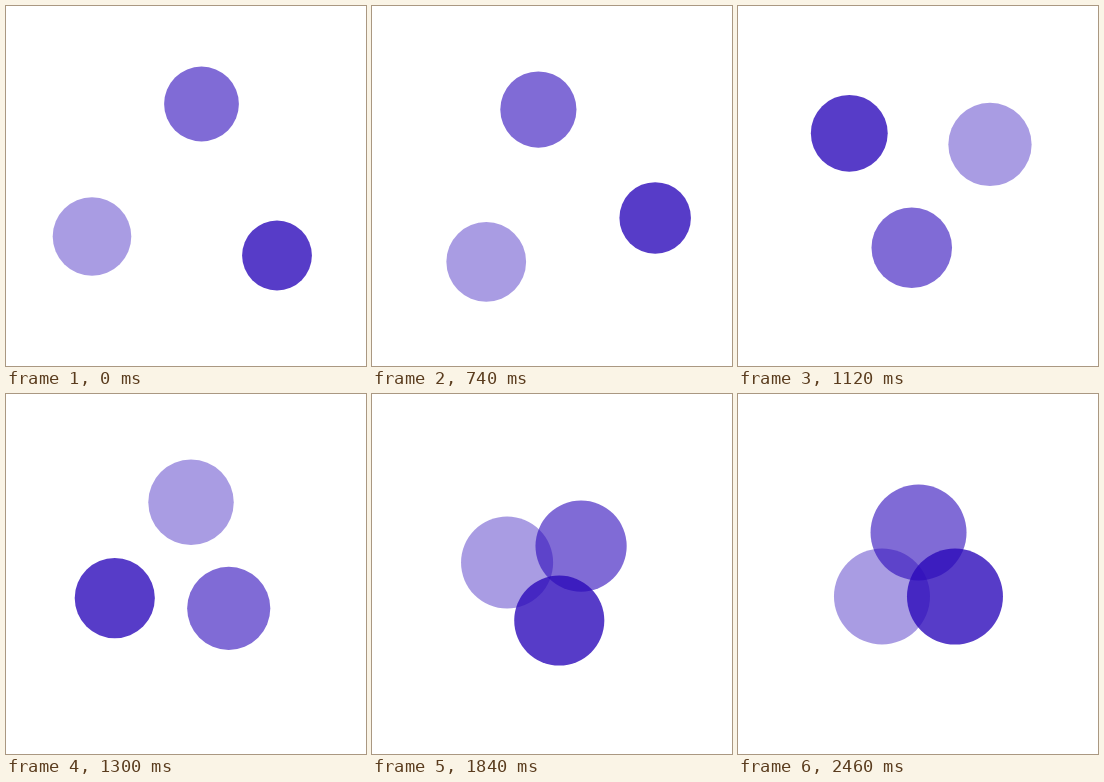
Recreate the animation shown at these times as an HTML page with a canvas. Size 360 by 360 pixels, loop 2480 ms.

```html
<!DOCTYPE html>
<html lang="en">
<head>
<meta charset="utf-8">
<title>Merging circles</title>
<style>
html, body { margin: 0; width: 100%; height: 100%; overflow: hidden; background: #fff; }
canvas { display: block; width: 100vw; height: 100vh; }
</style>
</head>
<body>
<canvas id="stage" width="360" height="360"></canvas>
<script>
const ctx = document.getElementById('stage').getContext('2d');
const LOOP = 2480, HOLD = 420, STEP = 20, END_R = 48;

// span: ms each circle takes to move in
const circles = [
  { from: [86, 230.5], to: [144, 202.5], r: 39.3, alpha: 0.4, span: 1600 },
  { from: [195.5, 98], to: [180.5, 138.5], r: 37.4, alpha: 0.595, span: 1490 },
  { from: [271, 249.5], to: [217, 202.5], r: 34.9, alpha: 0.79, span: 1655 }
];

const mix = (a, b, k) => a + (b - a) * k;

// Ease in and out from start over span, both in ms; skew > 1 delays the middle
function ease(t, start, span, skew = 1) {
  const x = Math.min(1, Math.max(0, (t - start) / span)) ** skew;
  return x * x * (3 - 2 * x);
}

function draw(time) {
  const t = Math.floor((time % LOOP) / STEP) * STEP - HOLD;
  const gather = ease(t, 0, 1600);
  const grow = ease(t, 0, 2050);
  // A long slow turn plus a quick spin make one full revolution
  const turn = 204 * ease(t, 0, 2060) + 156 * ease(t, 192, 662, 1.25);
  const a = turn * Math.PI / 180;
  const cos = Math.cos(a), sin = Math.sin(a);
  const px = mix(182.5, 178.7, gather), py = mix(179.8, 178, gather);

  ctx.fillStyle = '#fff';
  ctx.fillRect(0, 0, 360, 360);
  for (const c of circles) {
    const move = ease(t, 0, c.span);
    const x = mix(c.from[0], c.to[0], move) - px;
    const y = mix(c.from[1], c.to[1], move) - py;
    ctx.fillStyle = `rgba(42, 8, 186, ${c.alpha})`;
    ctx.beginPath();
    ctx.arc(px + x * cos + y * sin, py - x * sin + y * cos, mix(c.r, END_R, grow), 0, Math.PI * 2);
    ctx.fill();
  }
}

const begin = performance.now();
function tick() {
  draw(performance.now() - begin);
  requestAnimationFrame(tick);
}
tick();
</script>
</body>
</html>
```
